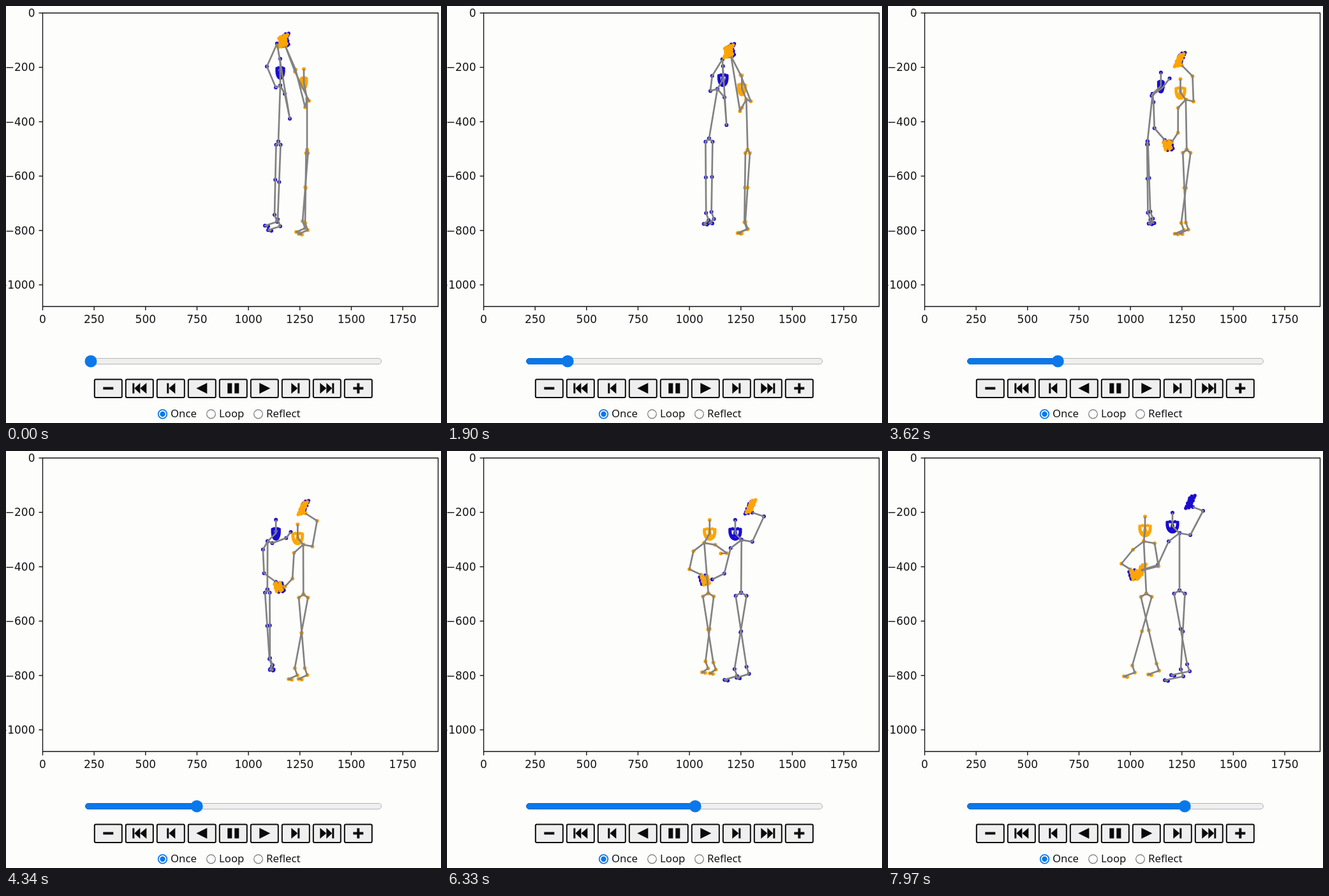
These frames come from a looping animation (682 px wide and 655 px high, 8 s). An HTML page with a canvas:

```html
<!DOCTYPE html>
<html lang="en">
<head>
<meta charset="utf-8">
<title>Pose player</title>
<style>
html, body { margin: 0; width: 100%; height: 100%; overflow: hidden; background: #fdfdfc; }
canvas { display: block; }
</style>
</head>
<body>
<canvas id="stage" width="682" height="655"></canvas>
<script>
const ctx = document.getElementById('stage').getContext('2d');
const LOOP = 8000, TAU = Math.PI * 2;
const PAPER = '#fdfdfc', INK = '#141414', FACE = '#efefef', ACCENT = '#0a78ea';
const BLUE = '#1a0cd0', ORANGE = '#fca506', BONE = '#828282';
const keySteps = [0, 61, 126, 201];
const SWAP_STEP = 142; // the tracker exchanges the two dancers here

// Each dancer is a puppet led by a few points, one per key step.
// turn: half shoulder width, point: reach of the toes.
const left = {
  head: [[430, 104], [434, 121], [418, 133], [403, 124]],
  neck: [[430, 125], [421, 133], [405, 146], [401, 142]],
  hip: [[427, 213], [403, 206], [413, 223], [405, 224]],
  highElbow: [[409, 95], [419, 117], [449, 146], [424, 181]],
  highHand: [[425, 59], [435, 96], [452, 142], [397, 188]],
  lowElbow: [[445, 177], [435, 192], [390, 192], [366, 177]],
  lowHand: [[448, 217], [448, 217], [411, 200], [380, 186]],
  footA: [[421, 328], [399, 324], [421, 326], [383, 337]],
  footB: [[426, 335], [409, 318], [415, 331], [421, 334]],
  body: [[-7, -15], [-13, 2], [17, 0], [17, -13]] // turn, point
};
const right = {
  head: [[467, 120], [460, 135], [456, 137], [446, 118]],
  neck: [[472, 146], [468, 147], [465, 147], [457, 129]],
  hip: [[472, 226], [471, 226], [464, 225], [457, 219]],
  highElbow: [[453, 103], [464, 111], [499, 109], [494, 94]],
  highHand: [[438, 63], [449, 87], [479, 103], [478, 88]],
  lowElbow: [[454, 100], [462, 197], [443, 202], [423, 179]],
  lowHand: [[455, 215], [455, 215], [429, 212], [397, 187]],
  footA: [[465, 338], [469, 340], [445, 342], [459, 343]],
  footB: [[469, 341], [465, 339], [470, 342], [469, 335]],
  body: [[3, -10], [9, -11], [17, -9], [17, -25]]
};

const lerp = (a, b, k) => a + (b - a) * k;
const mix = (p, q, k) => [lerp(p[0], q[0], k), lerp(p[1], q[1], k)];
const shift = ([x, y], dx, dy) => [x + dx, y + dy];
const ramp = (v, a, b) => Math.min(1, Math.max(0, (v - a) / (b - a)));

// Two early changes, then bursts of 22 changes with a short rest between.
function stepAt(t) {
  if (t < 460) return (t >= 50) + (t >= 110);
  const burst = Math.floor((t - 460) / 834), within = (t - 460) % 834;
  return 2 + 22 * burst + Math.min(22, 1 + Math.floor(within / 37));
}

function pose(dancer, step) {
  const i = step < keySteps[1] ? 0 : step < keySteps[2] ? 1 : 2;
  const k = ramp(step, keySteps[i], keySteps[i + 1]);
  const p = {};
  for (const part in dancer) p[part] = mix(dancer[part][i], dancer[part][i + 1], k);

  const [turn, point] = p.body;
  p.width = 3 + 0.3 * Math.abs(turn);
  p.lowHand = mix(p.highHand, p.lowHand, ramp(step, 43, 61));
  const leg = (side, ankle) => {
    const hip = shift(p.hip, side * turn / 2, 5);
    const toe = shift(ankle, point, 17);
    return [p.hip, hip, mix(hip, ankle, 0.5), ankle, shift(ankle, 4, 11), toe, shift(toe, 5, 1)];
  };
  p.chains = [
    [shift(p.head, 0, -21), p.head, p.neck, p.hip],
    [p.neck, shift(p.neck, turn, 3), p.highElbow, p.highHand],
    [p.neck, shift(p.neck, -turn, 13), p.lowElbow, p.lowHand],
    leg(1, p.footA),
    leg(-1, p.footB)
  ];
  return p;
}

function dot(x, y, r = 3) {
  ctx.beginPath();
  ctx.arc(x, y, r, 0, TAU);
  ctx.fill();
}

function path(points, closed) {
  ctx.beginPath();
  points.forEach(([x, y]) => ctx.lineTo(x, y));
  if (closed) ctx.closePath();
}

function drawFace([x, y], w) {
  for (let i = 0; i <= 14; i++) {
    const a = i / 14 * Math.PI;
    dot(x + w * Math.cos(a), y - 3 + 12 * Math.sin(a), 2.6);
  }
  for (let i = -2; i <= 2; i++) {
    dot(x + i * w / 2, y - 6 - Math.abs(i) % 2, 2.6);
    dot(x + i * w / 4, y + 4, 2.4);
    dot(x, y - 2 + i, 2.2);
  }
}

function drawHand([x, y], tilt, half, spread) {
  for (let i = -10; i <= 10; i++) {
    const k = i / 10;
    dot(x - tilt * k + spread * Math.sin(i * 2.4), y + half * k, 2.7);
  }
}

function drawDots(p, color) {
  ctx.fillStyle = color;
  p.chains.flat().forEach(([x, y]) => dot(x, y));
  drawFace(p.head, p.width);
  drawHand(p.highClasp, 4, 10, 3.5);
  drawHand(p.lowClasp, -2, 7, 5);
}

function drawBones(p) {
  ctx.strokeStyle = BONE;
  ctx.lineWidth = 2.7;
  ctx.lineJoin = 'round';
  for (const chain of p.chains) {
    path(chain);
    ctx.stroke();
  }
}

function drawDancers(step) {
  const a = pose(left, step), b = pose(right, step);
  b.highClasp = shift(b.highHand, -4, -8);
  b.lowClasp = mix(b.highClasp, shift(a.lowHand, 4, 8), ramp(step, 43, 61));
  a.highClasp = mix(shift(b.highClasp, 2, -2), a.highHand, ramp(step, 158, 201));
  a.lowClasp = shift(b.lowClasp, 3, 1);
  const pair = step < SWAP_STEP ? [a, b] : [b, a];
  drawDots(pair[0], BLUE);
  drawDots(pair[1], ORANGE);
  pair.forEach(drawBones);
}

function drawAxes() {
  ctx.strokeStyle = ctx.fillStyle = INK;
  ctx.lineWidth = 1.4;
  ctx.strokeRect(57.5, 11, 620, 461);
  ctx.font = '17px "DejaVu Sans", sans-serif';
  ctx.textAlign = 'center';
  for (let i = 0; i < 8; i++) {
    const x = 57.5 + i * 80.65;
    path([[x, 472], [x, 478]]);
    ctx.stroke();
    ctx.fillText(i * 250, x, 498);
  }
  ctx.textAlign = 'right';
  for (let i = 0; i < 6; i++) {
    const y = 11 + i * 85.4;
    path([[51.5, y], [57.5, y]]);
    ctx.stroke();
    ctx.fillText((i ? '\u2212' : '') + i * 200, 45.5, y + 6);
  }
}

function pill(x, w, fill, stroke) {
  ctx.beginPath();
  ctx.roundRect(x, 553.5, w, 9, 4.5);
  ctx.fillStyle = fill;
  ctx.fill();
  ctx.strokeStyle = stroke;
  ctx.lineWidth = 1;
  ctx.stroke();
}

function drawSlider(step) {
  const x = 133 + 1.37 * step + 0.36 * Math.max(0, step - 43);
  pill(124.5, 464, FACE, '#b4b4b4');
  pill(124.5, x - 124.5, ACCENT, '#0a6cd4');
  ctx.fillStyle = ACCENT;
  dot(x, 558, 9.5);
}

// Icon parts are relative to the button centre.
const bar = (x, w, y = -8, h = 16) => ctx.fillRect(x, y, w, h);
const tri = (tip, base) => { path([[tip, 0], [base, -8.5], [base, 8.5]], true); ctx.fill(); };
const minus = () => bar(-8, 16, -2, 4);
const first = () => { bar(-11, 3); tri(-8, 1); tri(1, 11); };
const prev = () => { bar(-6, 3); tri(-3, 7); };
const back = () => tri(-9, 8);
const pause = () => { bar(-9, 7); bar(2, 7); };
const plus = () => { minus(); bar(-2, 4); };
const flip = icon => () => { ctx.scale(-1, 1); icon(); };
const icons = [minus, first, prev, back, pause, flip(back), flip(prev), flip(first), plus];

function drawButtons() {
  icons.forEach((icon, i) => {
    ctx.save();
    ctx.translate(160.3 + i * 49, 600.5);
    ctx.beginPath();
    ctx.roundRect(-21.5, -14, 43, 28.5, 2);
    ctx.fillStyle = FACE;
    ctx.fill();
    ctx.strokeStyle = ctx.fillStyle = '#0a0a0a';
    ctx.lineWidth = 2;
    ctx.stroke();
    icon();
    ctx.restore();
  });
}

function drawRadios() {
  ctx.font = '16.8px "Noto Sans", sans-serif';
  ctx.textAlign = 'left';
  [['Once', 245.5], ['Loop', 321.5], ['Reflect', 395.5]].forEach(([label, x], i) => {
    ctx.beginPath();
    ctx.arc(x, 641, 6.8, 0, TAU);
    ctx.strokeStyle = i ? '#767676' : ACCENT;
    ctx.lineWidth = i ? 1.2 : 1.8;
    ctx.stroke();
    if (!i) {
      ctx.fillStyle = ACCENT;
      dot(x, 641, 4.2);
    }
    ctx.fillStyle = INK;
    ctx.fillText(label, x + 12.5, 646);
  });
}

function draw(t) {
  const step = stepAt(t);
  ctx.fillStyle = PAPER;
  ctx.fillRect(0, 0, 682, 655);
  drawAxes();
  drawDancers(step);
  drawSlider(step);
  drawButtons();
  drawRadios();
}

const start = performance.now();
function frame() {
  draw((performance.now() - start) % LOOP);
  requestAnimationFrame(frame);
}
frame();
</script>
</body>
</html>
```
